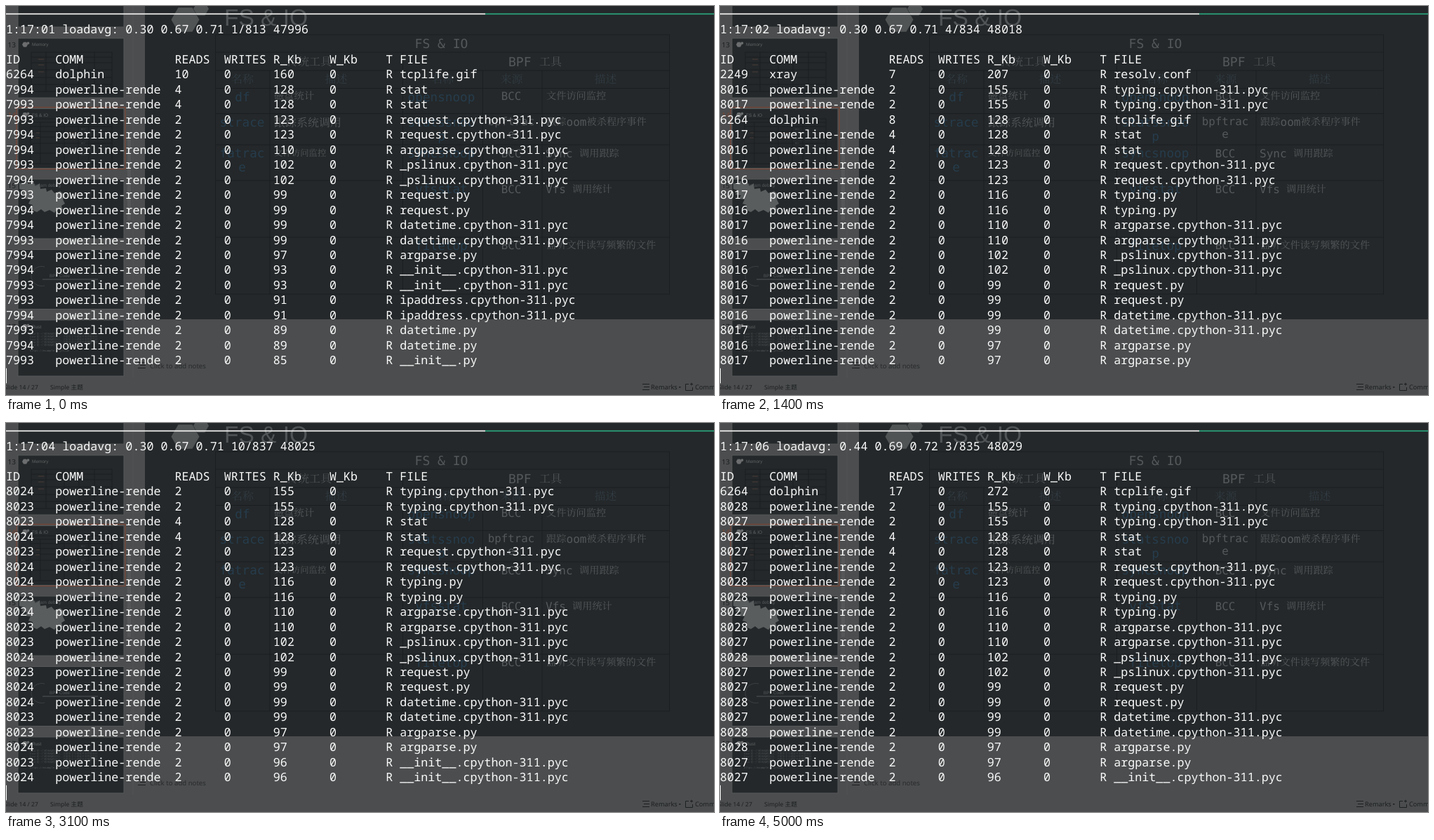
These frames come from a looping animation (1009 px wide and 555 px high, 5400 ms). An HTML page:

```html
<!DOCTYPE html>
<html lang="en">
<head>
<meta charset="utf-8">
<title>Terminal over slides</title>
<style>
  html, body { margin: 0; height: 100%; overflow: hidden; background: #4b4d4e; }
  svg { display: block; width: 1009px; height: 555px; }
  text { white-space: pre; text-rendering: geometricPrecision; }
  .term { font-family: "Noto Sans Mono", monospace; fill: #fafafa; }
  .mono { font-family: "DejaVu Sans Mono", monospace; }
  .cjk { font-family: "Noto Serif CJK SC", "Noto Sans CJK SC", sans-serif; }
  .ui { font-family: "Noto Sans", "Noto Sans CJK SC", sans-serif; }
  .title { font-family: "Liberation Sans", sans-serif; }
</style>
</head>
<body>
<svg id="stage" viewBox="0 0 1009 555">
  <g id="slides"></g>
  <g id="terminal"></g>
</svg>
<script>
const SVG = 'http://www.w3.org/2000/svg';
const slides = document.getElementById('slides');
const terminal = document.getElementById('terminal');

function add(parent, tag, attrs, content = '') {
  const node = document.createElementNS(SVG, tag);
  for (const key in attrs) node.setAttribute(key, attrs[key]);
  node.textContent = content;
  parent.append(node);
  return node;
}
const rect = (x, y, width, height, fill, more) =>
  add(slides, 'rect', { x, y, width, height, fill, ...more });
const path = (d, stroke, width = 1, fill = 'none') =>
  add(slides, 'path', { d, stroke, 'stroke-width': width, fill });
// Text placed by the vertical middle of its capitals or ideographs.
const label = (x, middle, content, size, fill, font = 'ui', anchor = 'start') =>
  add(slides, 'text', { x, y: middle + size * .365, 'font-size': size, fill, class: font, 'text-anchor': anchor }, content);
const centred = (x, middle, content, size, fill, font) => label(x, middle, content, size, fill, font, 'middle');

function hexagon(cx, cy, r, fill) {
  const points = Array.from({ length: 6 }, (_, i) =>
    [cx + r * Math.cos(i * Math.PI / 3), cy + r * Math.sin(i * Math.PI / 3)]);
  add(slides, 'polygon', { points: points.join(' '), fill });
}

const DARK = '#24282a', INK = '#1d2021', LINE = '#1b1e20', PALE = '#55585a', BLUE = '#263c4c', ORANGE = '#774536';

function drawThumbnails() {
  rect(180.5, 0, 1, 531, '#525455');
  rect(173, 180, 5, 125, '#545657');
  rect(17, -55, 151, 85, DARK, { stroke: '#565859' });
  [46, 146.5, 247, 347.5, 448].forEach((y, i) => {
    const current = i === 1;
    if (current) rect(15, y - 2, 155, 88, 'none', { stroke: ORANGE, 'stroke-width': 1.3 });
    rect(17, y, 151, i === 4 ? 80 : 85, DARK, { stroke: '#565859' });
    label(2.5, y + 9, String(13 + i), 10, current ? ORANGE : INK);
  });
  const heading = (y, name) => {
    hexagon(27, y, 4, '#6b6d6e');
    hexagon(31.5, y - 2, 2, '#6b6d6e');
    label(37, y, name, 6.5, '#606364', 'title');
  };
  heading(55, 'Memory');
  heading(155.5, 'FS & IO');
  heading(457.5, 'Rust');
  path('M36 66H151V122H36ZM36 73H151M36 81H151M36 91H151M36 102H151M36 112H151M57 66V122M83 66V122M104 66V122M126 66V122', LINE);
  path('M35 161H151V225H35ZM35 166H151M35 172H151M35 179H151M35 187H151M35 196H151M35 210H151M49 166V225M83 161V225M103 166V225M118 166V225', LINE);
  for (const y of [176, 181, 188, 196, 212]) label(107, y, 'BCC', 3.5, '#484c4e', 'mono');
  path('M43 181H48M42 188H48M86 181H100M86 188H100', '#493a36');
  path('M46 76H54M46 84H54M46 94H54', '#493a36');

  label(33, 256, 'Program debug', 6.5, '#55585a', 'title');
  path('M19 252L24 255L29 249L32 254L39 251L42 257L48 253L49 261L57 260L58 265L65 262L69 267L77 264L83 269L81 276L84 282L79 285L81 291L73 290L69 295L62 291L55 294L50 290L44 294L37 291L38 284L32 282L35 276L27 275L30 270L22 269L25 263L19 261Z', 'none', 0, '#5a5d5e');

  path('M55 372A15 14 0 1 0 55 399', '#3c4042');
  path('M52 390H131', '#515556');
  label(62, 385, 'BPF Code', 6.3, '#54585a', 'title');
  for (let i = 0; i < 5; i++)
    label(34, 467.5 + i * 4, 'Rust 是一门系统编程语言，注重安全与速度并发性能良好'.slice(0, i === 4 ? 13 : 28), 3.8, '#505456', 'cjk');
  label(34, 492, 'https://example.org/code', 3.9, '#515557', 'mono');
}

function drawTable() {
  const columns = [298.5, 376, 565.5, 679.5, 764, 945.5];
  const rows = [41, 66, 92, 117.5, 153.5, 198, 249, 330, 411];
  path(rows.map(y => `M298 ${y}H946`).join(''), LINE);
  path(columns.map((x, i) => `M${x} ${[41, 92, 66, 92, 92, 41][i]}V411`).join(''), LINE);

  centred(620.5, 53, 'FS & IO', 18, PALE, 'mono');
  centred(432, 79, '传统工具', 16, '#505456', 'cjk');
  label(716, 79, 'BPF', 18, PALE, 'mono');
  label(760, 79, '工具', 16, '#505456', 'cjk');
  [[337, '名称'], [470.5, '描述'], [622, '名称'], [720.5, '来源'], [854.5, '描述']]
    .forEach(([x, word]) => centred(x, 104, word, 16, '#303b43', 'cjk'));
  [[337, 130, 'df'], [336.5, 166, 'strace'], [336.5, 210, 'fatrac'], [336.5, 230, 'e'],
   [620.5, 130, 'opensnoop'], [620.5, 166, 'statssnoo'], [620.5, 186, 'p'],
   [620.5, 210, 'syncsnoop'], [620.5, 261, 'vfsstat'], [620.5, 342, 'filetop']]
    .forEach(([x, y, name]) => centred(x, y, name, 17.7, BLUE, 'mono'));
  [[128, 'BCC'], [164, 'bpftrac'], [182, 'e'], [210, 'BCC'], [261, 'BCC'], [341, 'BCC']]
    .forEach(([y, name]) => centred(720, y, name, 15.8, PALE, 'mono'));
  [[382, 128, '磁盘统计', 14.3], [382, 166, '跟踪系统调用', 16], [382, 209, '文件访问监控', 12.4],
   [770, 128, '文件访问监控', 14.2], [770, 165, '跟踪', 14.2], [827.5, 165, '被杀程序事件', 14.2],
   [817, 210, '调用跟踪', 14.2], [807, 261, '调用统计', 14.2], [770, 341, '监听文件读写频繁的文件', 14.2]]
    .forEach(([x, y, words, size]) => label(x, y, words, size, PALE, 'cjk'));
  [[798.5, 165, 'oom'], [769, 210, 'Sync'], [769, 261, 'Vfs']]
    .forEach(([x, y, word]) => label(x, y, word, 16, PALE, 'mono'));
}

function drawSlides() {
  rect(0, 0, 1009, 555, '#4b4d4e');
  rect(198, 0, 811, 447, DARK);
  drawThumbnails();
  hexagon(255.5, 19.5, 20, '#515455');
  hexagon(278, 4, 11, '#515455');
  label(311, 15.3, 'FS & IO', 33.5, '#515456', 'title');
  drawTable();

  path('M188 508.5H199M191 512.5H199M188 516.5H199', INK);
  label(205, 513.5, 'Click to add notes', 9.6, '#292b2c');
  label(-3, 544, 'Slide 14 / 27', 8.6, INK);
  label(63, 544, 'Simple 主题', 8.6, INK);
  path('M907 539.5H917M909 543.5H917M907 547.5H917', INK);
  label(919, 543.5, 'Remarks', 9.2, INK);
  rect(959, 543, 2.5, 1.5, INK);
  path('M973 539.5H968.5V548.5H978.5V544M975 539.5H979M977 537.5V541.5', INK);
  label(982, 543.5, 'Comments', 9.2, INK);
  rect(0, 10.5, 683, 1.7, '#f4f4f2');
  rect(683, 10.5, 326, 1.7, '#2aa67c');
}

const CELL = 10.03, PITCH = 21.48, BASELINE = 38.8;
const FONT_SIZE = CELL / .6;
const COMMANDS = {
  P: 'powerline-rende', D: 'dolphin', X: 'xray', V: 'Vivaldi-Extens', C: 'clear',
  F: 'ThreadPoolForeg', S: 'ThreadPoolSingl', Y: 'python', T: 'tmux: server'
};
// Rows: id, command, reads, writes, read Kb, written Kb, file; "*" is the bytecode suffix.
const SCREENS = [
  [0, '01 loadavg: 0.30 0.67 0.71 1/813 47996', `6264 D 10 0 160 0 tcplife.gif
7994 P 4 0 128 0 stat
7993 P 4 0 128 0 stat
7993 P 2 0 123 0 request*
7994 P 2 0 123 0 request*
7994 P 2 0 110 0 argparse*
7993 P 2 0 102 0 _pslinux*
7994 P 2 0 102 0 _pslinux*
7993 P 2 0 99 0 request.py
7994 P 2 0 99 0 request.py
7994 P 2 0 99 0 datetime*
7993 P 2 0 99 0 datetime*
7994 P 2 0 97 0 argparse.py
7994 P 2 0 93 0 __init__*
7993 P 2 0 93 0 __init__*
7993 P 2 0 91 0 ipaddress*
7994 P 2 0 91 0 ipaddress*
7993 P 2 0 89 0 datetime.py
7994 P 2 0 89 0 datetime.py
7993 P 2 0 85 0 __init__.py`],
  [700, '02 loadavg: 0.30 0.67 0.71 4/834 48018', ''],
  [800, '02 loadavg: 0.30 0.67 0.71 4/834 48018', `2249 X 7 0 207 0 resolv.conf
8016 P 2 0 155 0 typing*
8017 P 2 0 155 0 typing*
6264 D 8 0 128 0 tcplife.gif
8017 P 4 0 128 0 stat
8016 P 4 0 128 0 stat
8017 P 2 0 123 0 request*
8016 P 2 0 123 0 request*
8017 P 2 0 116 0 typing.py
8016 P 2 0 116 0 typing.py
8017 P 2 0 110 0 argparse*
8016 P 2 0 110 0 argparse*
8017 P 2 0 102 0 _pslinux*
8016 P 2 0 102 0 _pslinux*
8016 P 2 0 99 0 request.py
8017 P 2 0 99 0 request.py
8016 P 2 0 99 0 datetime*
8017 P 2 0 99 0 datetime*
8016 P 2 0 97 0 argparse.py
8017 P 2 0 97 0 argparse.py`],
  [1800, '03 loadavg: 0.30 0.67 0.71 7/832 48019', `6264 D 27 0 432 0 tcplife.gif
6728 V 1 0 343 0 ..com.vivaldi.Vivaldi.eQrcEp
8019 C 2 0 60 0 tmux-256color
6678 F 2 0 56 0 partners.json
7931 Y 2 0 15 0 loadavg
6681 S 3 15 0 7 Web Data-journal
6681 S 0 3 0 6 Web Data
6754 V 1 0 3 0 statm
6728 V 1 0 3 0 status
6728 V 1 0 3 0 statm
6754 V 1 0 3 0 status
8019 C 3 0 2 0 libc.so.6
6678 F 0 22 0 2 000173.log
663 T 2 0 2 0 cmdline
6677 F 0 1 0 0 ..com.vivaldi.Vivaldi.fpRSRG
8019 C 1 0 0 0 libncursesw.so.6.4
6680 F 0 2 0 0 000173.log`],
  [3100, '04 loadavg: 0.30 0.67 0.71 10/837 48025', `8024 P 2 0 155 0 typing*
8023 P 2 0 155 0 typing*
8023 P 4 0 128 0 stat
8024 P 4 0 128 0 stat
8023 P 2 0 123 0 request*
8024 P 2 0 123 0 request*
8024 P 2 0 116 0 typing.py
8023 P 2 0 116 0 typing.py
8024 P 2 0 110 0 argparse*
8023 P 2 0 110 0 argparse*
8023 P 2 0 102 0 _pslinux*
8024 P 2 0 102 0 _pslinux*
8023 P 2 0 99 0 request.py
8024 P 2 0 99 0 request.py
8024 P 2 0 99 0 datetime*
8023 P 2 0 99 0 datetime*
8023 P 2 0 97 0 argparse.py
8024 P 2 0 97 0 argparse.py
8023 P 2 0 96 0 __init__*
8024 P 2 0 96 0 __init__*`],
  [4000, '05 loadavg: 0.44 0.69 0.72 5/835 48026', `8026 C 2 0 60 0 tmux-256color
6677 F 2 0 56 0 partners.json
7931 Y 2 0 15 0 loadavg
6723 F 2 0 8 0 nsswitch.conf
6678 F 2 0 8 0 resolv.conf
6723 F 2 0 8 0 resolv.conf
6678 F 2 0 8 0 nsswitch.conf
8024 P 1 0 8 0 uptime
6681 S 3 15 0 7 Web Data-journal
6681 S 0 3 0 6 Web Data
6754 V 1 0 3 0 statm
6728 V 1 0 3 0 status
6728 V 1 0 3 0 statm
6754 V 1 0 3 0 status
8026 C 3 0 2 0 libc.so.6
663 T 2 0 2 0 cmdline
8023 P 2 0 1 0 humanize_bytes*
8024 P 2 0 1 0 humanize_bytes*
6678 F 0 18 0 1 000173.log
8024 P 1 0 1 0 online`],
  [5000, '06 loadavg: 0.44 0.69 0.72 3/835 48029', `6264 D 17 0 272 0 tcplife.gif
8028 P 2 0 155 0 typing*
8027 P 2 0 155 0 typing*
8028 P 4 0 128 0 stat
8027 P 4 0 128 0 stat
8027 P 2 0 123 0 request*
8028 P 2 0 123 0 request*
8028 P 2 0 116 0 typing.py
8027 P 2 0 116 0 typing.py
8028 P 2 0 110 0 argparse*
8027 P 2 0 110 0 argparse*
8028 P 2 0 102 0 _pslinux*
8027 P 2 0 102 0 _pslinux*
8027 P 2 0 99 0 request.py
8028 P 2 0 99 0 request.py
8027 P 2 0 99 0 datetime*
8028 P 2 0 99 0 datetime*
8028 P 2 0 97 0 argparse.py
8027 P 2 0 97 0 argparse.py
8027 P 2 0 96 0 __init__*`]
];

function formatRow(row) {
  const [id, command, reads, writes, readKb, writeKb, ...file] = row.split(' ');
  return id.padEnd(7) + (COMMANDS[command] || command).padEnd(17) + reads.padEnd(7) + writes.padEnd(7) +
    readKb.padEnd(8) + writeKb.padEnd(8) + 'R ' + file.join(' ').replace('*', '.cpython-311.pyc');
}

const HEADER = formatRow('ID COMM READS WRITES R_Kb W_Kb FILE').replace('R FILE', 'T FILE');
let shown = -1;

function showScreen(index) {
  const [, status, body] = SCREENS[index];
  const rows = body ? body.split('\n').map(formatRow) : [];
  const lines = ['1:17:' + status, '', HEADER, ...rows];
  terminal.replaceChildren();
  lines.forEach((line, i) =>
    add(terminal, 'text', { x: 0, y: BASELINE + i * PITCH, class: 'term', 'font-size': FONT_SIZE }, line));
  add(terminal, 'rect', { x: 0, y: 22.8 + lines.length * PITCH, width: 1, height: 21.5, fill: '#fafafa' });
}

function tick() {
  const time = performance.now() % 5400;
  const index = SCREENS.findLastIndex(([start]) => start <= time);
  if (index !== shown) showScreen(shown = index);
  requestAnimationFrame(tick);
}

drawSlides();
tick();
</script>
</body>
</html>
```
